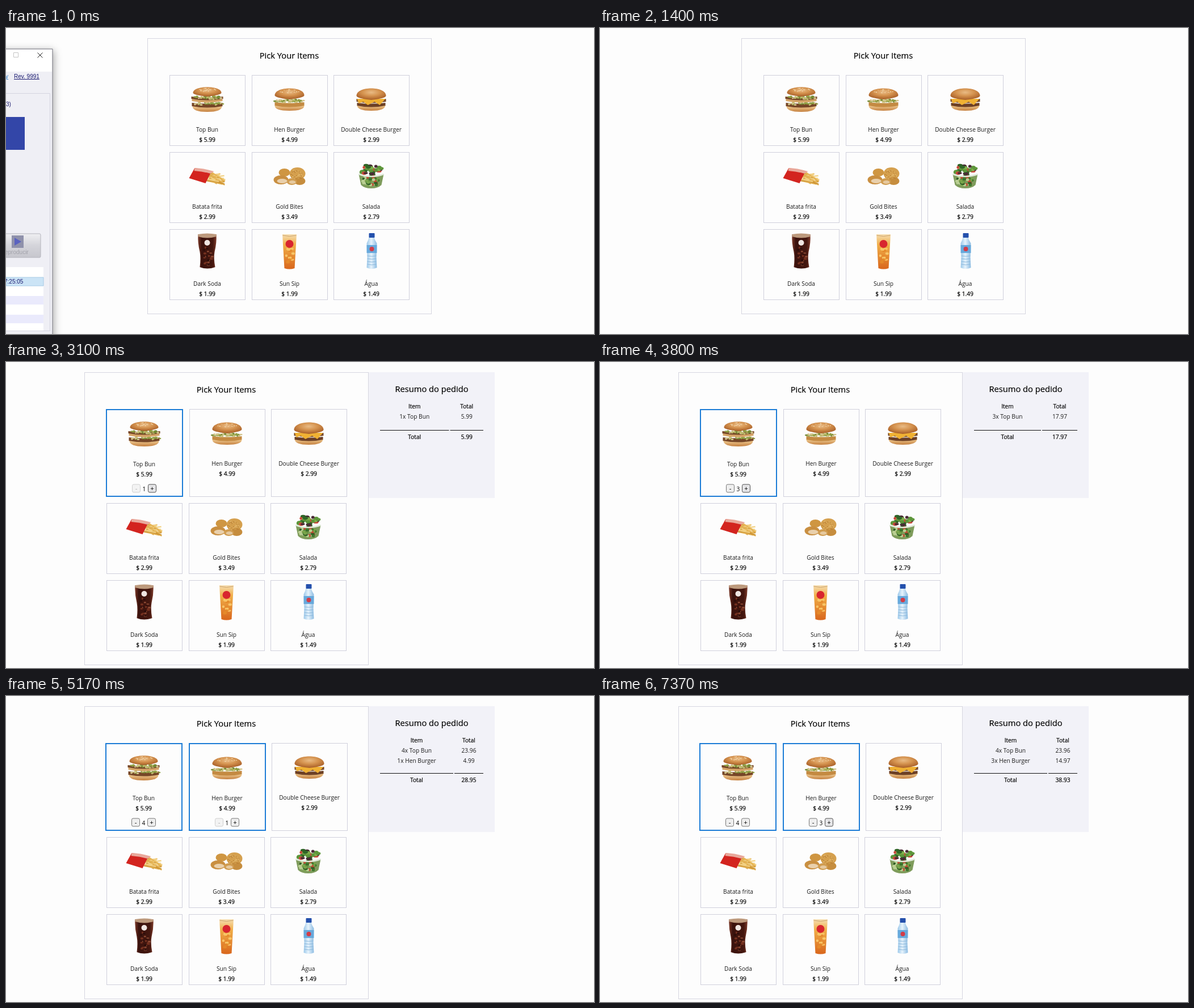
An HTML page that plays this animation: 1036 by 540 pixels, repeating every 8000 ms.

```html
<!DOCTYPE html>
<html lang="en">
<head>
<meta charset="utf-8">
<style>
  html, body { margin: 0; width: 100%; height: 100%; overflow: hidden; background: #fdfdfd; }
  svg { display: block; }
  text { font: 10.2px "Open Sans", sans-serif; text-anchor: middle; fill: #000; }
  .name { fill: #1c1c1c; }
  .title { font-size: 14.7px; stroke: #000; stroke-width: .2px; }
  .strong { stroke: #000; stroke-width: .2px; }
  .window text { font: 10px "Liberation Sans", sans-serif; text-anchor: start; fill: #1a1a70; }
</style>
</head>
<body>
<svg id="stage" width="1036" height="540" viewBox="0 0 1036 540">
  <defs>
    <radialGradient id="crust" cy=".35" r=".6"><stop stop-color="#e9bb85"/><stop offset=".5" stop-color="#d5934f"/><stop offset="1" stop-color="#ad642c"/></radialGradient>
    <linearGradient id="heel" x2="0" y2="1"><stop stop-color="#efcb92"/><stop offset="1" stop-color="#c5803f"/></linearGradient>
    <linearGradient id="cola" x2="1"><stop stop-color="#7c3a2a"/><stop offset=".2" stop-color="#3a120d"/><stop offset=".8" stop-color="#44170f"/><stop offset="1" stop-color="#7c3a2a"/></linearGradient>
    <linearGradient id="tea" x2="0" y2="1"><stop stop-color="#f6dfb4"/><stop offset=".3" stop-color="#f0ae48"/><stop offset="1" stop-color="#d9661c"/></linearGradient>
    <linearGradient id="water" x2="1"><stop stop-color="#9cc8ea"/><stop offset=".45" stop-color="#e6f3fc"/><stop offset="1" stop-color="#8dbce2"/></linearGradient>
    <linearGradient id="button" x2="0" y2="1"><stop stop-color="#efeff2"/><stop offset=".5" stop-color="#d4d4da"/><stop offset="1" stop-color="#c6c6cd"/></linearGradient>
  </defs>
  <g id="page"></g>
  <g id="window" class="window">
    <path d="M-20 37H82V560H-20Z" fill="#efeff5" stroke="#77777f" style="filter:drop-shadow(2px 3px 7px #0005)"/>
    <path d="M0 38H81V77H0Z" fill="#fff"/>
    <path d="M55.500 43.500l9 9m0-9l-9 9" stroke="#222" fill="none"/>
    <path d="M13.500 43.500h8v8h-8z" stroke="#c4c4c4" fill="none"/>
    <path d="M-5 115.500H77.500V534.500H-5" stroke="#d4d4e0" fill="none"/>
    <text x="-1" y="89" text-decoration="underline" style="fill:#2a7fd0">y</text>
    <text x="14" y="89" text-decoration="underline">Rev. 9991</text>
    <text x="0" y="138">3)</text>
    <rect x="-25" y="157" width="58" height="58" fill="#3346a8"/>
    <rect x="-20" y="363" width="81" height="42" rx="2" fill="url(#button)" stroke="#b4b4bc"/>
    <rect x="10" y="366" width="21" height="22" fill="#8f91ab"/>
    <path d="M15 370l12 7-12 7z" fill="#5a62c0"/>
    <text x="-2" y="399" style="fill:#a2a2aa">eproducir</text>
    <path d="M0 422H66V534H0Z" fill="#fff"/>
    <path d="M0 473H66V488H0ZM0 506H66V521H0Z" fill="#eaeafc"/>
    <path d="M0 440H66V455H0Z" fill="#cbe4f6" stroke="#a8cbe6"/>
    <text x="-3" y="451">7:25:05</text>
  </g>
</svg>
<script>
const page = document.getElementById('page'), win = document.getElementById('window');

let seed = 7;
const rnd = () => (seed = seed * 16807 % 2147483647) / 2147483647;
const repeat = (n, fn) => Array.from({ length: n }, (_, i) => fn(i)).join('');
const path = (d, fill, extra = '') => `<path d="${d}" fill="${fill}" ${extra}/>`;
const oval = (x, y, rx, ry, fill) => `<ellipse cx="${x}" cy="${y}" rx="${rx}" ry="${ry}" fill="${fill}"/>`;
const box = (x, y, w, h, fill, extra = '') => `<rect x="${x}" y="${y}" width="${w}" height="${h}" fill="${fill}" ${extra}/>`;
const text = (x, y, s, cls = '') => `<text x="${x}" y="${y}" class="${cls}">${s}</text>`;

// Food pictures: x is measured from the card centre, y from the card top.
const dots = (n, x, y, rx, ry, r, colors) => repeat(n, i => {
  const a = rnd() * 6.283, d = Math.sqrt(rnd());
  return oval(x + rx * d * Math.cos(a), y + ry * d * Math.sin(a), r * (.7 + rnd() * .6), r * (.5 + rnd() * .4), colors[i % colors.length]);
});
const crown = (w, y, h) => path(`M${-w} ${y + h * .75}C${-w} ${y - h * .22} ${w} ${y - h * .22} ${w} ${y + h * .75}Q${w} ${y + h} 0 ${y + h + 3}Q${-w} ${y + h} ${-w} ${y + h * .75}`, 'url(#crust)');
const heel = (w, y, h) => path(`M${-w} ${y}H${w}Q${w} ${y + h} 0 ${y + h}T${-w} ${y}`.replace('T', `Q${-w} ${y + h} `), 'url(#heel)');
const patty = (w, y, h, fill) => path(`M${-w} ${y}Q0 ${y + 3} ${w} ${y}V${y + h - 2}Q0 ${y + h + 3} ${-w} ${y + h - 2}Z`, fill);
const greens = ['#8fa045', '#bcbb6c', '#738a35', '#d3c58d'];
const leaves = (w, y, n = 30) => dots(n, 0, y, w, 2.6, 2.3, greens);
const sesame = (n, w, y) => dots(n, 0, y, w, 4, .8, ['#f7e3bd']);

const food = [
  heel(26, 55, 10) + patty(27, 49, 8, '#764627') + leaves(29, 51) + patty(27, 42, 6, '#d6a568') +
    patty(28, 38, 6, '#764627') + leaves(29, 40) + crown(25, 21, 14) + sesame(24, 17, 27),
  heel(26, 54, 9) + patty(26, 48, 8, '#c48a42') + leaves(28, 46, 56) + crown(26, 23, 17) + sesame(24, 18, 29),
  heel(25, 53, 10) + patty(25, 49, 7, '#6d4025') + patty(26, 42, 7, '#76472a') +
    path('M-25 42H25L15 53 6 47-6 53-14 47-22 50Z', '#f0b133') + crown(26, 23, 18),
  repeat(28, i => path(`M${-4 + rnd() * 12} ${35 + rnd() * 16}L${14 + rnd() * 18} ${38 + rnd() * 20}`, 'none',
      `stroke="${['#e6b556', '#cf9738', '#f2d184'][i % 3]}" stroke-width="2.300"`)) +
    path('M-32 46L-22 28Q-8 30 6 37L-3 55Z', '#d3241f') + path('M-22 28Q-8 28 12 34L6 38Q-8 34-23 33Z', '#e9a89b'),
  oval(-9, 36, 10, 7, '#cf9642') + oval(14, 38, 14, 11, '#d5a04e') + oval(18, 51, 10, 7, '#c68d3e') +
    oval(-15, 49, 13, 8, '#c98f41') + oval(4, 52, 9, 6, '#d09c50') + oval(-13, 51, 9, 4, '#e9d0ac') + oval(5, 53, 6, 3, '#e6c99f') +
    dots(40, 12, 40, 12, 9, 1, ['#b47a2f', '#e7bf76']),
  dots(34, 0, 31, 19, 9, 3.8, ['#2f6527', '#7fae4b', '#4a2b35', '#5d963a', '#c9473a']) +
    path('M-22 39Q0 46 22 39L18 58Q12 64 0 64T-18 58Z', '#7f9c5c') + dots(52, 0, 51, 15, 9, 3, ['#3e7a2d', '#79a54b', '#2f5c25', '#bd4a32', '#b9cf92']) +
    path('M-22 39Q0 47 22 39', 'none', 'stroke="#dfe9da" stroke-width="2.500"'),
  path('M-16 9H16Q17 24 13 40 11 51 14 67 0 72-13 67-11 51-13 40-17 24-16 9', 'url(#cola)') +
    path('M-16 9Q0 6 16 9L16 13Q0 18-16 13Z', '#bd9a7d') + dots(22, 0, 48, 9, 17, 2.2, ['#74301f', '#8d4a34', '#2a0d0a']) + oval(0, 24, 5, 5, '#efe6e2'),
  path('M-12.500 9H12.500L9 69Q0 72-9 69Z', 'url(#tea)') + dots(16, 0, 45, 7, 17, 2.6, ['#f8c566', '#e58a2a']) +
    path('M-12 11Q0 14 12 11', 'none', 'stroke="#c9a06a"') + oval(0, 26, 7, 7, '#d8252f'),
  path('M-4 14H5Q6 19 10 25L9 50 10 68Q1 72-8 68L-7 50-8 25Q-5 19-4 14', 'url(#water)') +
    box(-4, 7, 10, 8, '#2450ac', 'rx="1"') + box(-8, 28, 18, 14, '#67a9dc') + oval(1, 35, 4, 4, '#d33c48') +
    repeat(4, i => path(`M-7 ${47 + i * 5}Q1 ${49 + i * 5} 9 ${47 + i * 5}`, 'none', 'stroke="#8db9dc"'))
];

const names = ['Top Bun', 'Hen Burger', 'Double Cheese Burger', 'Batata frita', 'Gold Bites', 'Salada', 'Dark Soda', 'Sun Sip', 'Água'];
const prices = [5.99, 4.99, 2.99, 2.99, 3.49, 2.79, 1.99, 1.99, 1.49];

const clicks = [[1430, 3540, 3800, 4070], [5170, 7000, 7340]];
const hovers = [[3100, 4470], [6430, 8000]];
const PRESS = 70;
const shifts = [[0, 0, 0], [-1, 1, 1], [-2, 0, 2]];

const buttonLooks = {
  normal: ['#efefef', '#767676', '#000'],
  hover: ['#e5e5e7', '#4f4f4f', '#000'],
  pressed: ['#f5f5f5', '#8d8d8d', '#000'],
  disabled: ['#f3f3f3', '#cfcfcf', '#aaa']
};
function button(x, y, sign, look) {
  const [fill, edge, ink] = buttonLooks[look];
  return box(x + .5, y + .5, 14, 14, fill, `stroke="${edge}" rx="2.500"`) +
    `<text x="${x + 7.5}" y="${y + 11.5}" style="fill:${ink};font-size:11.5px">${sign}</text>`;
}

function card(i, selected, count, look) {
  const col = i % 3, row = i / 3 | 0, on = count > 0, edge = on ? 2 : 1;
  const x = [288, 433, 577][col] - (selected ? 111 : 0) + (row ? 0 : shifts[selected][col]);
  const y = 83 + 136 * row + (selected && row ? 30 : 0);
  const w = on ? 136 : 134, h = selected && !row ? 155 : 125;
  const mid = x + w / 2 - .5, top = y + edge - 1;
  return box(x + edge / 2, y + edge / 2, w - edge, h - edge, 'none', `stroke="${on ? '#1c7cd6' : '#d0d0dc'}" stroke-width="${edge}"`) +
    `<g transform="translate(${mid} ${top})">${food[i]}</g>` +
    text(mid, top + 100, names[i], 'name') +
    text(mid, top + 117.5, '$ ' + prices[i].toFixed(2), 'strong') +
    (on ? button(mid - 21.5, y + 132.5, '-', count > 1 ? 'normal' : 'disabled') +
      text(mid, y + 144.5, count) + button(mid + 6.5, y + 132.5, '+', look) : '');
}

function summary(counts) {
  const lines = counts.map((n, i) => [n, i]).filter(([n]) => n);
  const extra = 16 * (lines.length - 1);
  const split = extra ? 789 : counts[0] > 1 ? 778 : 781.5;
  const left = (658 + split) / 2, right = (split + 842) / 2;
  const row = (y, a, b, cls) => text(left, y, a, cls) + text(right, y, b, cls);
  const total = lines.reduce((sum, [n, i]) => sum + n * prices[i], 0);
  return box(639, 18, 222, 222, '#f2f2f8') + text(750, 53, 'Resumo do pedido', 'title') +
    row(82, 'Item', 'Total', 'strong') +
    lines.map(([n, i], k) => row(100 + 17.5 * k, `${n}x ${names[i]}`, (n * prices[i]).toFixed(2), 'name')).join('') +
    path(`M659 ${120.5 + extra}H${split - 1}M${split + 1} ${120.5 + extra}H841`, 'none', 'stroke="#111"') +
    row(136 + extra, 'Total', total.toFixed(2), 'strong');
}

let shown = '';
function draw(now) {
  const t = now % 8000;
  win.setAttribute('opacity', t < 70 ? 1 : t < 100 ? .3 : 0);

  const counts = clicks.map(list => list.filter(c => c <= t).length);
  const looks = clicks.map((list, i) =>
    list.slice(1).some(c => t >= c - PRESS && t < c) ? 'pressed' :
    t >= hovers[i][0] && t < hovers[i][1] ? 'hover' : 'normal');
  const key = counts + '|' + looks;
  if (key !== shown) {
    shown = key;
    const selected = counts.filter(Boolean).length, x = selected ? 138 : 249;
    page.innerHTML = (selected ? summary(counts) : '') +
      box(x + .5, 18.5, 500, selected ? 516 : 486, 'none', 'stroke="#d6d6e0"') +
      text(x + 250, 53.5, 'Pick Your Items', 'title') +
      names.map((_, i) => card(i, selected, counts[i] || 0, looks[i])).join('');
  }
  requestAnimationFrame(draw);
}
draw(performance.now());
</script>
</body>
</html>
```
